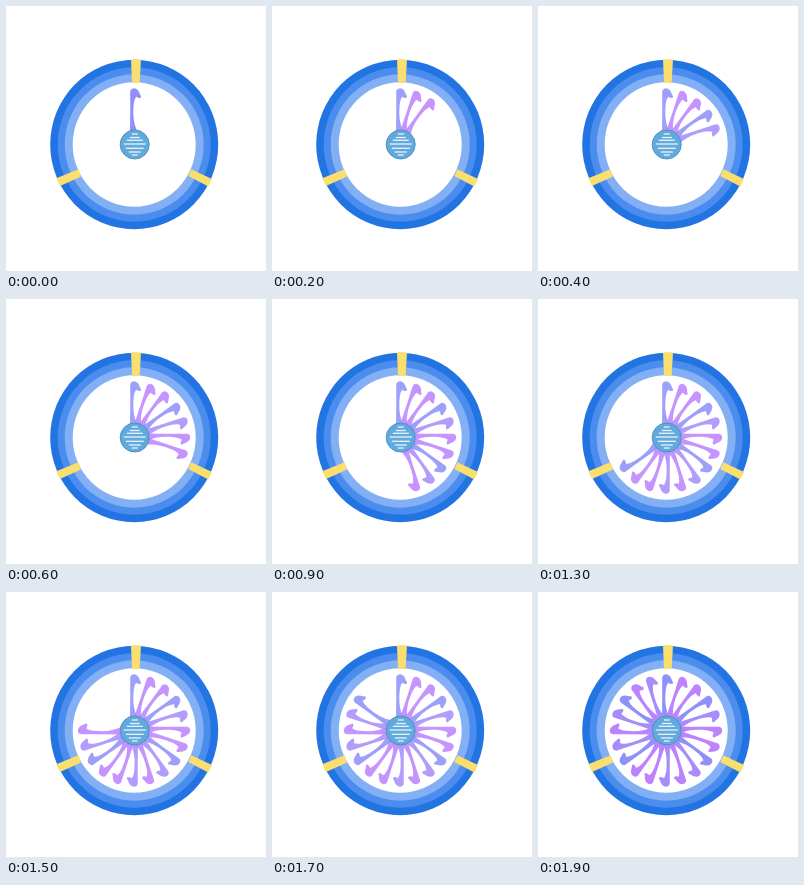
These frames come from a looping animation (260x265 px, 2 s). An HTML page:

```html
<!DOCTYPE html>
<html lang="en">
<head>
<meta charset="utf-8">
<title>Petal wheel</title>
<style>
  html, body { margin: 0; width: 100%; height: 100%; overflow: hidden; background: #fff; }
  svg { display: block; width: 260px; height: 265px; }
</style>
</head>
<body>
<svg viewBox="0 0 260 265">
  <defs>
    <path id="petal" d="M-3.8 -53.5 Q-2.5 -57 1.3 -56 Q4.5 -55 6 -50 Q7.6 -48 6.8 -46.8
      Q4.5 -46 2.3 -47.8 Q0.5 -46 -0.3 -40 C-1.5 -28 0 -20 3.5 -13 L-4 -13 Q-3.6 -32 -3.8 -53.5Z"/>
  </defs>
  <g id="ring"></g>
  <g fill="#fbdf6e">
    <path d="M125 53.3 L135 53.3 L133.6 77 L126 77Z"/>
    <path d="M50.3 172.3 L72.5 163.3 L75 170.5 L54 180Z"/>
    <path d="M185.3 163.3 L206 173 L202.3 180.6 L182.3 170Z"/>
  </g>
  <g id="petals" transform="translate(128 138.5)"></g>
  <circle cx="128.7" cy="138.5" r="14.5" fill="#62a9dc" stroke="#4d91c5"/>
  <g id="stripes" stroke="#e8f4fc" stroke-width="1.3"></g>
</svg>
<script>
const PETALS = 20, STEP = 100;
const BLUE = "#8f90fa", LAVENDER = "#a78dfc", VIOLET = "#bd83ff";
const pattern = "BVVBLVVBLVLVVBLVLBVL";
const colors = { B: BLUE, L: LAVENDER, V: VIOLET };

function add(parentId, tag, attributes) {
  const node = document.createElementNS("http://www.w3.org/2000/svg", tag);
  for (const [name, value] of Object.entries(attributes)) node.setAttribute(name, value);
  return document.getElementById(parentId).appendChild(node);
}

for (const [radius, fill] of [[84, "#2374e3"], [76.5, "#4b8def"], [69.5, "#83b0f4"], [61.5, "#fff"]]) {
  add("ring", "ellipse", { cx: 128.2, cy: 138.5, rx: radius, ry: radius + 0.7, fill });
}

for (const [y, half] of [[128, 3], [131.5, 5], [134.3, 8], [138, 11], [142.3, 9], [146, 6], [149, 3]]) {
  add("stripes", "line", { x1: 128.8 - half, x2: 128.8 + half, y1: y, y2: y });
}

const petals = Array.from({ length: PETALS }, (_, i) => add("petals", "use", {
  href: "#petal", fill: colors[pattern[i]], transform: `rotate(${i * 360 / PETALS})`
}));

function draw(now) {
  const last = Math.floor(now / STEP) % PETALS;
  // The wheel is paler while it is filling up.
  const filling = last > 0 && last < PETALS - 1;
  petals.forEach((petal, i) => {
    petal.style.display = i <= last ? "" : "none";
    petal.style.opacity = filling ? 0.86 : 1;
  });
}

const start = performance.now();
function tick() {
  draw(performance.now() - start);
  requestAnimationFrame(tick);
}
tick();
</script>
</body>
</html>
```
